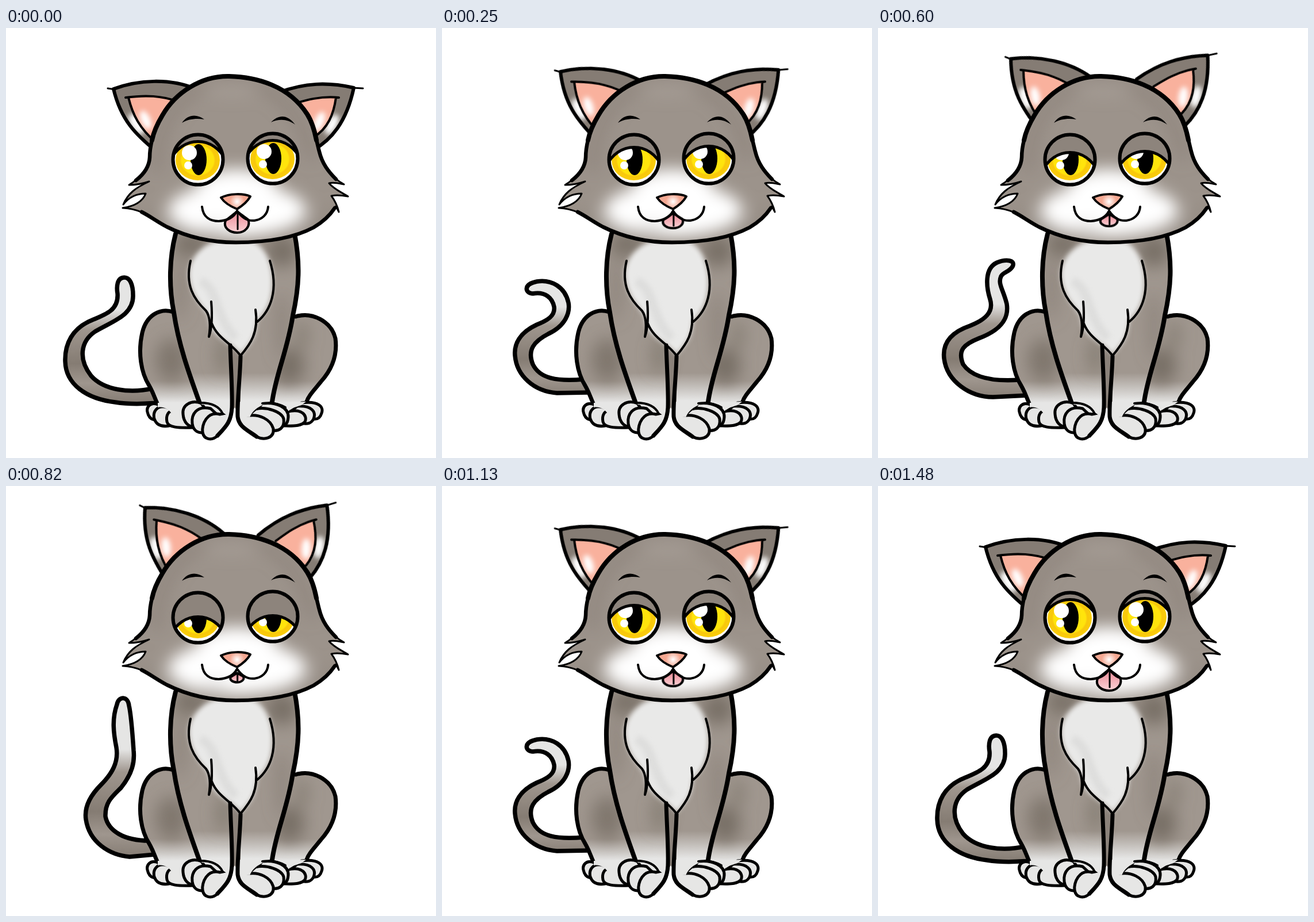
An HTML page without scripts that plays this animation: 748 by 748 pixels, repeating every 1570 ms.

```html
<!DOCTYPE html>
<html lang="en">
<head>
<meta charset="utf-8">
<title>Blinking cat</title>
<style>
  html, body { margin: 0; width: 100%; height: 100%; overflow: hidden; background: #fff; }
  svg { display: block; width: 100vw; height: 100vh; }
  .ink { fill: none; stroke: #000; stroke-width: 5; stroke-linecap: round; stroke-linejoin: round; }
  .bold { stroke-width: 8; }
  .firm { stroke-width: 6.5; }
  .fine { stroke-width: 4; }
  .thin { stroke-width: 3; }
  .tail path { stroke: #000; stroke-width: 7.5; stroke-linejoin: round; }
  .paw { fill: #e6e6e5; }

  .earL, .earR, .lid, .tongue, .tail { animation: 1570ms step-end infinite; }
  .earL { transform-origin: 213px 121px; animation-name: earL; }
  .earR { transform-origin: 574px 121px; animation-name: earR; }
  .lid { animation-name: lid; }
  .tongue { transform-origin: 402px 330px; animation-name: tongue; }
  .tongue path { vector-effect: non-scaling-stroke; }
  .tail { visibility: hidden; }
  .low { animation-name: low; }
  .curl { animation-name: curl; }
  .hook { animation-name: hook; }
  .high { animation-name: high; }

  @keyframes earL {
    0%, 85.987%, 100% { transform: none; }
    15.924%, 71.975% { transform: translate(17px, -27px) rotate(7deg); }
    29.936%, 57.962% { transform: translate(40px, -47px) rotate(13deg); }
    43.949% { transform: translate(49px, -61px) rotate(18deg); }
  }
  @keyframes earR {
    0%, 85.987%, 100% { transform: none; }
    15.924%, 71.975% { transform: translate(-17px, -27px) rotate(-8deg); }
    29.936%, 57.962% { transform: translate(-26px, -49px) rotate(-15deg); }
    43.949% { transform: translate(-39px, -61px) rotate(-20deg); }
  }
  @keyframes lid {
    0%, 85.987%, 100% { transform: none; }
    15.924%, 71.975% { transform: translateY(10px); }
    29.936%, 57.962% { transform: translateY(19px); }
    43.949% { transform: translateY(30px); }
  }
  @keyframes tongue {
    0%, 85.987%, 100% { transform: none; }
    15.924%, 71.975% { transform: scale(.84, .7); }
    29.936%, 57.962% { transform: scale(.72, .57); }
    43.949% { transform: scale(.56, .44); }
  }
  @keyframes low { 0%, 85.987%, 100% { visibility: visible; } 15.924% { visibility: hidden; } }
  @keyframes curl { 0%, 29.936%, 85.987%, 100% { visibility: hidden; } 15.924%, 71.975% { visibility: visible; } }
  @keyframes hook { 0%, 43.949%, 71.975%, 100% { visibility: hidden; } 29.936%, 57.962% { visibility: visible; } }
  @keyframes high { 0%, 57.962%, 100% { visibility: hidden; } 43.949% { visibility: visible; } }
</style>
</head>
<body>
<svg viewBox="0 0 748 748" xmlns="http://www.w3.org/2000/svg">
  <defs>
    <filter id="soft" x="-60%" y="-60%" width="220%" height="220%"><feGaussianBlur stdDeviation="14"/></filter>
    <filter id="mist" x="-60%" y="-60%" width="220%" height="220%"><feGaussianBlur stdDeviation="4"/></filter>

    <linearGradient id="fur" gradientUnits="userSpaceOnUse" x1="0" y1="600" x2="0" y2="648">
      <stop offset="0" stop-color="#a0978f"/><stop offset="1" stop-color="#e6e6e5"/>
    </linearGradient>
    <linearGradient id="hipFur" href="#fur" y1="614" y2="652"/>
    <linearGradient id="tailFur" gradientUnits="userSpaceOnUse" x1="0" y1="490" x2="0" y2="660">
      <stop offset="0" stop-color="#e5e5e4"/><stop offset=".2" stop-color="#9f968e"/>
      <stop offset=".55" stop-color="#857c73"/><stop offset=".75" stop-color="#9f968e"/>
      <stop offset="1" stop-color="#7f766d"/>
    </linearGradient>
    <linearGradient id="curlFur" href="#tailFur" y1="485" y2="650"/>
    <linearGradient id="hookFur" href="#tailFur" y1="480" y2="655"/>
    <linearGradient id="highFur" href="#tailFur" y1="458" y2="655"/>
    <radialGradient id="iris">
      <stop offset=".72" stop-color="#ffe40c"/><stop offset=".8" stop-color="#f8c70c"/>
      <stop offset="1" stop-color="#f9cd0a"/>
    </radialGradient>
    <radialGradient id="noseTone" gradientUnits="userSpaceOnUse" cx="402" cy="302" r="15">
      <stop offset="0" stop-color="#fff"/><stop offset=".85" stop-color="#f5a892"/>
    </radialGradient>
    <linearGradient id="tongueTone" x2="0" y2="1">
      <stop offset=".2" stop-color="#ee97a2"/><stop offset="1" stop-color="#fbd3d6"/>
    </linearGradient>

    <path id="head" d="M388 84C340 83 295 112 272 152C256 180 252 205 250 225C248 245 232 262 214 273C228 273 240 270 249 267C225 278 212 288 204 307C214 294 226 288 243 288C238 301 224 310 203 313C240 315 255 333 280 346C320 366 360 373 400 373C460 373 505 363 535 347C552 337 565 324 574 310L579 320C576 308 572 300 566 292C576 290 584 291 595 293C582 285 570 280 562 270C570 268 578 270 588 272C570 262 552 245 545 215C541 190 535 167 524 150C492 100 435 85 388 84Z"/>
    <path id="trunk" d="M296 355C284 400 283 450 292 495C300 550 318 600 337 655L330 672H390L398 660L405 672H465L462 650C468 600 488 560 499 500C510 450 512 410 502 355Z"/>
    <path id="hipL" d="M292 495C268 486 244 500 237 530C229 565 235 600 249 622C258 636 258 645 262 655L335 668L337 655Z"/>
    <path id="hipR" d="M503 502C532 493 566 510 573 540C577 570 566 595 548 615C535 631 526 640 523 652L465 668L463 650Z"/>
    <clipPath id="headClip"><use href="#head"/></clipPath>
    <clipPath id="trunkClip"><use href="#trunk"/></clipPath>
    <clipPath id="hipLClip"><use href="#hipL"/></clipPath>
    <clipPath id="hipRClip"><use href="#hipR"/></clipPath>
    <clipPath id="eyeClip"><circle cx="334" cy="229" r="43"/></clipPath>
    <clipPath id="stripL"><path d="M187 107L212 121C220 150 232 175 262 200V215C225 185 200 160 187 107Z"/></clipPath>
    <clipPath id="stripR"><path d="M605 106L574 121C570 150 560 175 535 190V212C565 195 592 165 605 106Z"/></clipPath>

    <g id="ball">
      <circle cx="334" cy="229" r="43" fill="#fff"/>
      <ellipse cx="333.500" cy="230" rx="38.500" ry="35" fill="url(#iris)"/>
      <ellipse cx="335" cy="229" rx="14" ry="27"/>
      <circle cx="319" cy="217" r="13" fill="#fff"/>
      <circle cx="317" cy="239" r="7" fill="#fff"/>
    </g>
    <path id="lidShape" d="M285 232C305 186 363 186 383 232V120H285Z" fill="#8d847c" stroke="#000" stroke-width="5"/>
    <circle id="ring" class="ink" cx="334" cy="229" r="43.500" style="stroke-width:6"/>
  </defs>

  <rect width="748" height="748" fill="#fff"/>

  <g class="tail low"><path fill="url(#tailFur)" d="M255 627C215 636 170 630 148 605C125 575 130 545 155 528C185 510 222 500 221 465C221 445 215 434 206 434C193 434 192 450 194 462C196 490 175 498 150 508C115 522 102 550 103 580C104 620 140 645 190 651C215 655 240 654 264 652"/></g>
  <g class="tail curl"><path fill="url(#curlFur)" d="M247 611C200 615 170 610 158 585C148 560 160 545 185 532C215 518 223 495 220 478C214 450 190 437 165 441C140 446 145 462 158 462C180 458 192 470 195 485C197 500 185 508 165 516C135 530 125 550 127 570C130 605 160 632 200 635L257 634"/></g>
  <g class="tail hook"><path fill="url(#hookFur)" d="M247 612C205 615 165 610 148 585C138 560 150 550 175 540C215 525 228 505 224 480C218 455 208 445 214 432C218 424 228 425 234 415C240 403 222 402 207 408C185 418 188 450 195 472C202 495 185 508 160 518C125 530 112 550 115 575C120 615 160 642 200 642L260 639"/></g>
  <g class="tail high"><path fill="url(#highFur)" d="M249 617C205 617 178 600 173 575C172 550 185 540 200 525C220 500 224 480 222 460C220 430 218 400 214 382C212 365 196 365 193 380C184 405 187 430 192 455C196 480 185 500 165 520C145 540 136 560 139 580C145 620 180 642 215 645L260 641"/></g>

  <!-- haunches -->
  <use href="#hipL" fill="url(#hipFur)"/>
  <g clip-path="url(#hipLClip)">
    <ellipse cx="288" cy="578" rx="28" ry="38" fill="#786f66" filter="url(#soft)" opacity=".8"/>
  </g>
  <use href="#hipR" fill="url(#hipFur)"/>
  <g clip-path="url(#hipRClip)">
    <g fill="#786f66" filter="url(#soft)"><ellipse cx="492" cy="588" rx="28" ry="32"/><ellipse cx="515" cy="535" rx="10" ry="26" opacity=".7"/></g>
  </g>
  <path class="ink bold" style="stroke-width:7" d="M291 494C268 486 244 500 237 530C229 565 235 600 249 622C257 636 259 645 264 655M504 502C532 493 566 510 573 540C577 570 566 595 548 615C535 631 526 640 523 650"/>

  <!-- back paws -->
  <g class="ink paw">
    <path d="M264 655C250 650 244 660 246 668C248 678 254 682 262 682L290 675Z"/>
    <path d="M280 660C262 655 255 668 258 680C262 692 272 694 284 692L310 675Z"/>
    <path d="M294 667C282 663 278 675 280 685C282 695 300 696 326 695L322 666Z"/>
    <path d="M514 652C545 648 553 660 549 670C546 680 540 681 534 680L500 668Z"/>
    <path d="M506 658C532 656 540 668 535 680C530 690 522 688 516 688L490 672Z"/>
    <path d="M488 668C515 660 525 675 520 685C512 694 495 692 480 692L478 672Z"/>
  </g>
  <path d="M264 652L336 650V676H292C285 664 275 658 264 660ZM464 652L522 650L514 656C500 660 490 664 488 672H464Z" fill="#e6e6e5"/>

  <!-- trunk -->
  <use href="#trunk" fill="url(#fur)"/>
  <g clip-path="url(#trunkClip)">
    <g fill="#786f66" filter="url(#soft)">
      <ellipse cx="322" cy="376" rx="32" ry="20"/>
      <ellipse cx="480" cy="388" rx="28" ry="28"/>
      <ellipse cx="303" cy="450" rx="8" ry="60" opacity=".6"/>
      <ellipse cx="378" cy="570" rx="12" ry="32" opacity=".7"/>
      <ellipse cx="480" cy="520" rx="10" ry="60" opacity=".5"/>
    </g>
    <path d="M391 550L408 570V668H391Z" fill="#8b827a"/>
  </g>
  <path d="M368 370C345 376 322 395 318 425C318 462 340 482 352 500L356 520C368 540 392 548 408 568C425 550 436 535 436 510C452 495 466 475 463 430C460 402 450 382 428 370Z" fill="#e9e9e8" filter="url(#mist)"/>
  <path d="M338 440C372 455 360 500 400 540" fill="none" stroke="#d9d9d8" stroke-width="16" filter="url(#mist)" opacity=".7"/>
  <path class="ink fine" d="M321 405C311 448 327 472 348 492C355 502 356 518 353 537C358 523 359 500 357 476M358 514C368 540 392 548 408 570C425 550 440 530 434 490M437 511C460 492 475 456 459 405"/>
  <path class="ink bold" d="M295 358C284 400 283 450 292 495C300 550 318 600 336 650M502 358C512 410 510 450 499 500C490 560 470 600 463 650"/>

  <!-- front paws -->
  <g class="ink paw">
    <path d="M340 653C322 646 306 656 308 672C309 686 318 695 328 693L350 668Z"/>
    <path d="M356 662C332 656 322 672 324 688C326 702 336 706 346 703L370 675Z"/>
    <path d="M372 672C350 666 340 690 342 703C344 716 358 719 368 709C382 694 392 686 392 668Z"/>
    <path d="M446 653C470 650 492 660 491 677C490 690 485 692 476 692L436 665Z"/>
    <path d="M434 663C454 658 480 668 483 680C485 696 475 702 462 700L424 672Z"/>
    <path d="M424 674C440 672 460 680 465 697C467 713 450 718 436 711C420 700 403 695 403 674Z"/>
  </g>
  <path d="M341 648H390V682C384 672 378 668 372 669C364 660 352 656 340 655ZM405 650H458L446 656C438 660 430 664 424 677C414 676 408 680 405 686Z" fill="#e6e6e5"/>
  <path class="ink fine" d="M338 652C355 652 370 656 377 671M446 653C460 651 474 653 486 660"/>
  <path class="ink" d="M390 552C391 590 394 630 393 660C392 685 382 694 368 709M408 571C407 610 402 650 403 676C405 693 418 698 436 711" style="stroke-width:7"/>

  <!-- ears -->
  <g class="earL">
    <path d="M187 106C230 90 285 87 330 106L262 215C225 185 200 160 187 106Z" fill="#857c74"/>
    <g clip-path="url(#stripL)"><ellipse cx="227" cy="167" rx="10" ry="20" fill="#fff" filter="url(#mist)" transform="rotate(-32 227 167)"/></g>
    <path d="M213 121C245 116 270 118 300 128L262 200C232 175 220 150 213 121Z" fill="#f9b19d"/>
    <ellipse cx="243" cy="160" rx="8" ry="17" fill="#fff" filter="url(#mist)" transform="rotate(-24 243 160)"/>
    <path class="ink fine" d="M208 121C245 116 270 118 300 128M213 121C220 150 232 175 262 200"/>
    <path class="ink" d="M330 106C285 87 230 90 187 106C200 160 225 185 262 215" style="stroke-width:6"/>
    <path class="ink thin" d="M177 105L190 107"/>
  </g>
  <g class="earR">
    <path d="M605 104C560 94 520 95 475 112L535 212C565 195 592 165 605 104Z" fill="#857c74"/>
    <g clip-path="url(#stripR)"><ellipse cx="567" cy="168" rx="9" ry="19" fill="#fff" filter="url(#mist)" transform="rotate(28 567 168)"/></g>
    <path d="M574 121C545 118 520 126 500 132L535 190C560 175 570 150 574 121Z" fill="#f9b19d"/>
    <ellipse cx="545" cy="163" rx="8" ry="18" fill="#fff" filter="url(#mist)" transform="rotate(22 545 163)"/>
    <path class="ink fine" d="M579 121C545 118 520 126 500 132M574 121C570 150 560 175 535 190"/>
    <path class="ink" d="M475 112C520 95 560 94 605 104C592 165 565 195 535 212" style="stroke-width:6"/>
    <path class="ink thin" d="M603 104L621 105"/>
  </g>

  <!-- head -->
  <use href="#head" fill="#9c938b"/>
  <g clip-path="url(#headClip)">
    <g filter="url(#soft)">
      <path d="M262 250C262 160 310 95 388 92S520 150 532 230" fill="none" stroke="#857b73" stroke-width="18" opacity=".6"/>
      <ellipse cx="392" cy="106" rx="48" ry="8" fill="#aba39b"/>
      <ellipse cx="402" cy="317" rx="120" ry="46" fill="#fff"/>
      <ellipse cx="402" cy="275" rx="70" ry="30" fill="#fff"/>
      <ellipse cx="402" cy="315" rx="85" ry="48" fill="#fff"/>
      <path d="M225 312C260 340 290 354 325 364" fill="none" stroke="#8e857d" stroke-width="14" opacity=".6"/>
      <path d="M510 362C545 346 555 330 575 312" fill="none" stroke="#8e857d" stroke-width="14" opacity=".7"/>
      <ellipse cx="365" cy="346" rx="26" ry="7" fill="#cfccca" opacity=".7"/>
    </g>
  </g>
  <use href="#head" class="ink thin"/>
  <path class="ink bold" d="M254 195C257 180 263 167 272 152C295 112 340 83 388 84C435 85 492 100 524 150C533 164 537 180 540 195"/>
  <path class="ink firm" d="M254 195C251 207 250 215 250 225C249 243 239 255 226 265M540 195C542 202 543 208 545 215C550 236 561 250 574 263"/>
  <path class="ink firm" d="M236 320C250 327 263 337 280 346C320 366 360 373 400 373C460 373 505 363 535 347C552 337 564 325 572 313"/>

  <!-- brows -->
  <path d="M306 165C316 150 332 149 345 159C331 157 318 158 306 165ZM461 164C474 150 490 150 503 168C490 159 477 157 461 164Z"/>

  <!-- eyes -->
  <g>
    <g clip-path="url(#eyeClip)"><use href="#ball"/><g class="lid"><use href="#lidShape"/></g></g>
    <use href="#ring"/>
  </g>
  <g transform="translate(130 -2)">
    <g clip-path="url(#eyeClip)"><use href="#ball"/><g class="lid"><use href="#lidShape"/></g></g>
    <use href="#ring"/>
  </g>

  <!-- muzzle -->
  <g class="tongue">
    <path class="ink fine" d="M402 319L382 335C377 348 390 356 402 356C416 356 426 345 421 333Z" style="fill:url(#tongueTone)"/>
    <path class="ink thin" d="M403 322V350"/>
  </g>
  <path class="ink fine" d="M341 311C343 330 356 336 370 336C386 335 397 328 402 318C410 330 420 336 432 335C446 333 455 324 456 311"/>
  <path class="ink fine" d="M374 295C388 288 412 287 425 293C420 302 410 310 402 315C392 311 380 304 374 295Z" style="fill:url(#noseTone)"/>
</svg>
</body>
</html>
```
